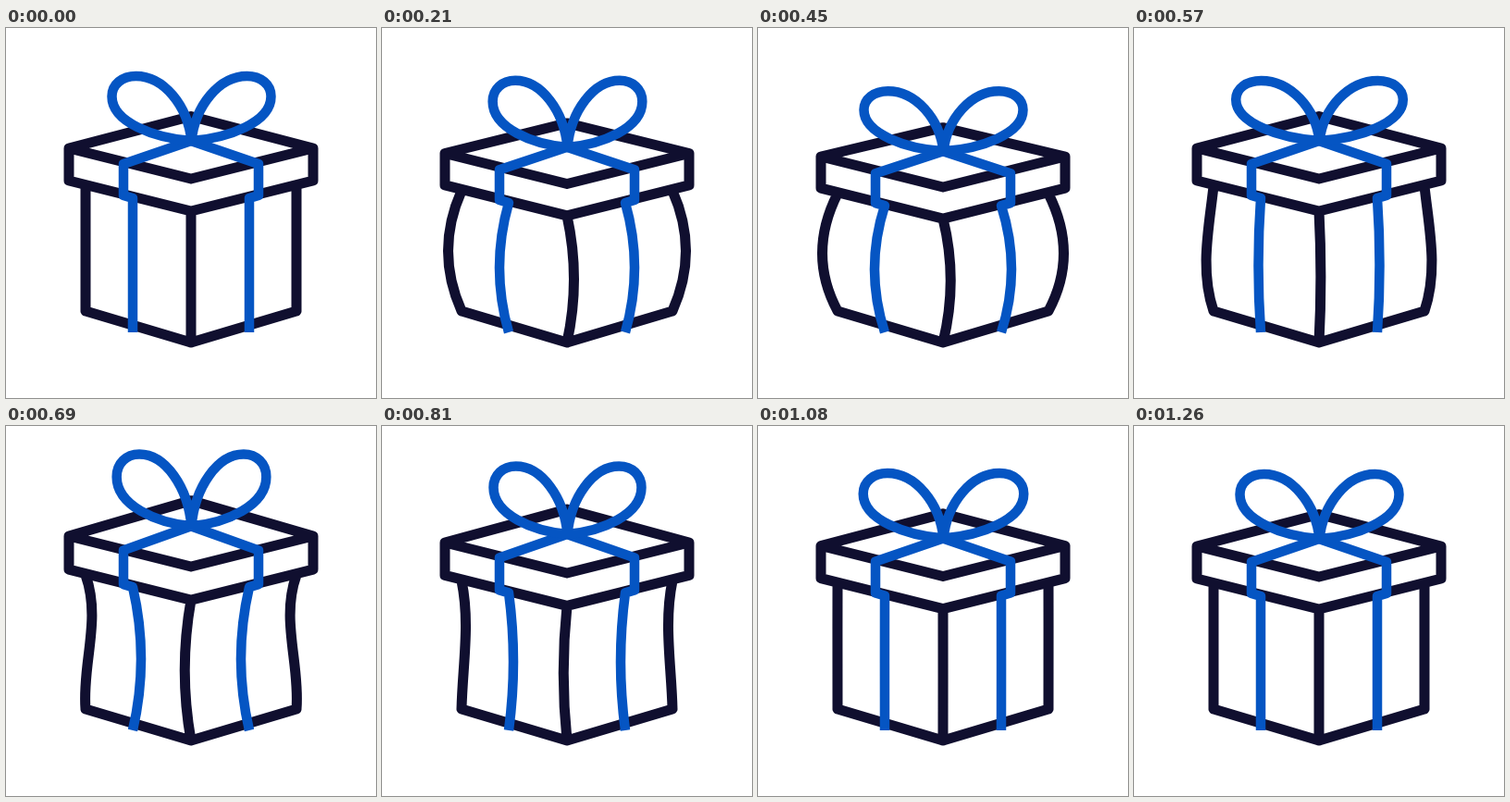
Write an HTML page that moves like this. It is 400 by 400 pixels and loops after 1320 ms.

```html
<!DOCTYPE html>
<html lang="en">
<head>
<meta charset="utf-8">
<title>Gift box</title>
<style>
  html, body { margin: 0; width: 100%; height: 100%; overflow: hidden; background: #fff; }
  svg { display: block; width: 100%; height: 100%; }
  path { fill: none; stroke-linejoin: round; stroke-linecap: round; }
  #box { stroke: #100f2f; stroke-width: 11; }
  #ribbon, #bow { stroke: #0555c3; stroke-width: 10.5; }
  #ribbon { stroke-linecap: butt; }
</style>
</head>
<body>
<svg viewBox="0 0 400 400">
  <path id="box"/>
  <path id="ribbon"/>
  <path id="bow"/>
</svg>
<script>
const LOOP = 1320, STEP = 30;
const times = [0, 210, 360, 450, 570, 690, 810, 930, 1110, 1260];
const tracks = {
  drop:  [0, 5.5, 11.5, 9, 0, -11, -4, 3, -1, 0],
  side:  [0, 14.5, 18, 16.5, 7.5, -5, -4, 0, 0, 0],
  inner: [0, 10, 12.5, 11, 2.5, -9, -5, 0, 0, 0],
  bowW:  [1, .94, .96, 1, 1.05, .94, .93, .99, 1.01, 1],
  bowH:  [1, 1.03, 1, .93, .93, 1.11, 1.05, .97, 1.01, 1]
};
const part = id => document.getElementById(id);

// Smooth curve through the keys, at rest at both ends
function sample(keys, t) {
  const last = times.length - 1;
  if (t >= times[last]) return keys[last];
  const i = times.findIndex(x => x > t) - 1;
  const span = times[i + 1] - times[i], u = (t - times[i]) / span;
  const slope = k => k < 1 || k >= last ? 0
    : (keys[k + 1] - keys[k - 1]) / (times[k + 1] - times[k - 1]) * span;
  const ease = u * u * (3 - 2 * u);
  return keys[i] + (keys[i + 1] - keys[i]) * ease
    + slope(i) * u * (1 - u) ** 2 - slope(i + 1) * u * u * (1 - u);
}

// Upright edge pushed sideways near its upper and lower third
function edge(x, top, bottom, upper, lower = upper) {
  const h = bottom - top;
  return `M${x} ${top}C${x + upper} ${top + h / 3} ${x + lower} ${bottom - h / 3} ${x} ${bottom}`;
}

function draw(t) {
  const [drop, side, inner, bowW, bowH] = Object.values(tracks).map(k => sample(k, t));
  const back = 95.5 + drop * 1.35, rim = 130 + drop, front = 163 + drop;
  const base = 165 + drop * .9, tip = 198 + drop * .9;
  const knot = 122 + drop * 1.25, fold = 147 + drop * 1.15, hem = 181 + drop * .9;

  const upper = inner * 1.45 / .75;
  const lower = (side - inner * .725) / .375;
  const strap = inner / .75;

  part('box').setAttribute('d',
    `M200 ${back}L332 ${rim}L200 ${front}L68 ${rim}Z` +
    `M68 ${rim}V${base}L200 ${tip}L332 ${base}V${rim}` +
    edge(86, base + 6, 306, -upper, -lower) +
    edge(314, base + 6, 306, upper, lower) +
    edge(200, tip, 340, strap * .75) +
    'M86 306L200 340L314 306');

  const strip = sign => {
    const x = n => 200 + sign * n;
    return `M200 ${knot}L${x(73)} ${fold}V${hem}L${x(63)} ${hem + 3}` +
      edge(x(63), hem + 3, 329, sign * strap).replace('M', 'L');
  };
  part('ribbon').setAttribute('d', strip(-1) + strip(1));

  const loop = sign => {
    const p = (x, y) => `${200.5 + sign * x * bowW} ${knot - y * bowH} `;
    return 'M' + p(0, 0) + 'C' + p(40, 3) + p(86, 20) + p(86, 48) +
      p(86, 61) + p(75, 70) + p(60, 70) + p(30, 70) + p(4, 38) + p(0, 0);
  };
  part('bow').setAttribute('d', loop(-1) + loop(1));
}

function tick() {
  const t = performance.now() % LOOP;
  draw(Math.floor(t / STEP) * STEP);
  requestAnimationFrame(tick);
}
tick();
</script>
</body>
</html>
```
